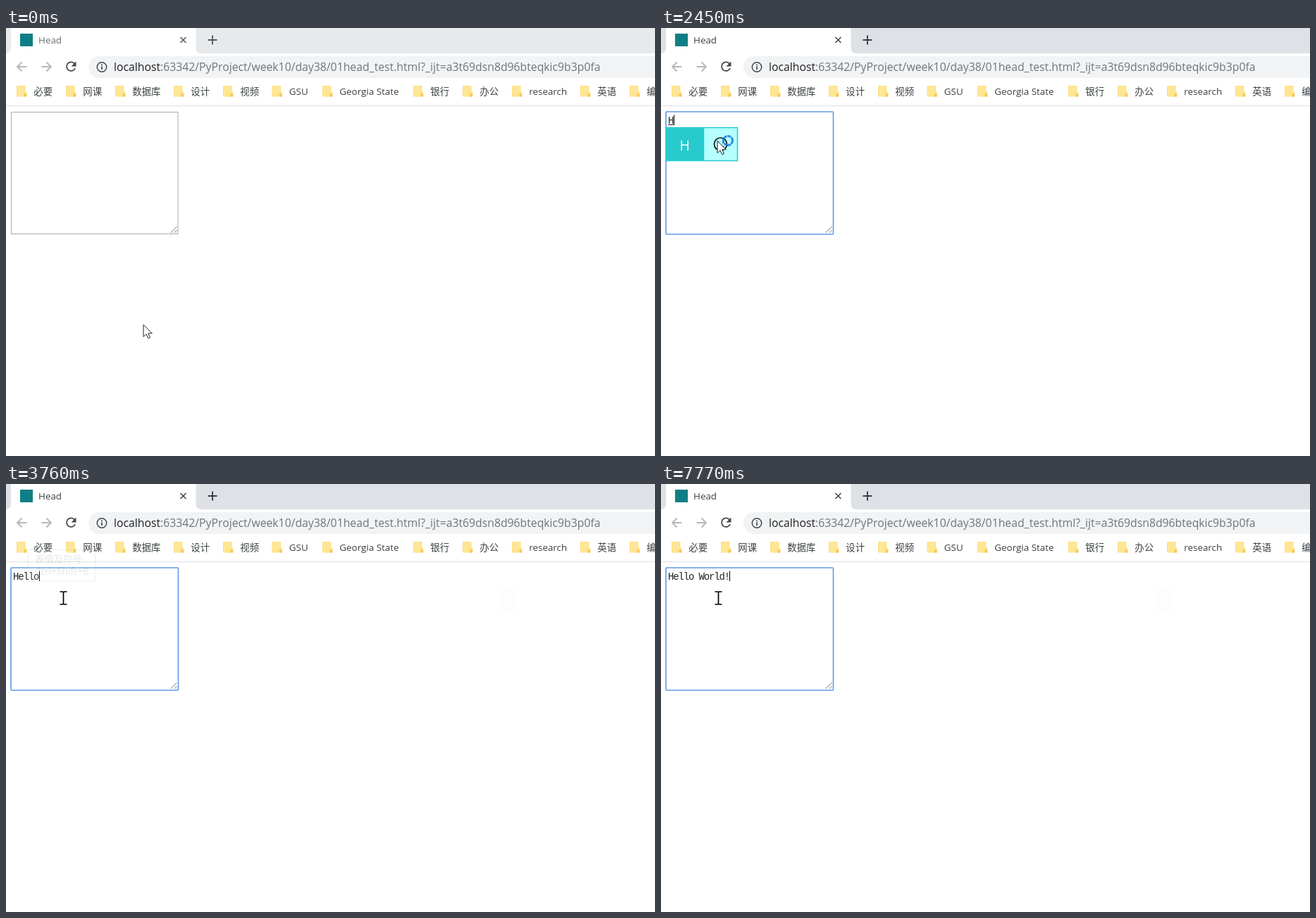
These frames come from a looping animation (921x608 px, 8 s). An HTML page:

```html
<!DOCTYPE html>
<html lang="zh">
<head>
<meta charset="utf-8">
<title>Head</title>
<style>
  html, body { margin: 0; width: 100%; height: 100%; overflow: hidden; background: #fff; }
  svg { display: block; font-family: "Open Sans", "Noto Sans CJK SC", "Noto Sans CJK", sans-serif; }
  text { white-space: pre; }
  .small { font-size: 13.4px; fill: #3c4043; }
  .typed { font: 14px "Liberation Mono", monospace; letter-spacing: -1.15px; fill: #222; }
  .word { font-size: 19.5px; }
  .index { font-size: 13.5px; fill: #777; }
  .line { fill: none; stroke: #45494d; stroke-width: 1.8; }
</style>
</head>
<body>
<svg width="921" height="608" viewBox="0 0 921 608">
  <rect id="strip" width="921" height="36"/>
  <path d="M-1 36Q7 36 7 28V0H269.500V28Q269.500 36 277.500 36Z" fill="#fff"/>
  <rect x="20" y="8" width="18" height="18" fill="#0e7f86"/>
  <g id="tab">
    <text x="46" y="22.3" font-size="13.4">Head</text>
    <path d="M247.5 13l8 8m0-8l-8 8" stroke="currentColor" stroke-width="1.5"/>
    <path d="M286.5 17h13M293 10.5v13" stroke="currentColor" stroke-width="1.9"/>
  </g>

  <path class="line" style="stroke:#b5b7ba" d="M29.5 55H16.5M22.5 48.5L16 55l6.5 6.5M50.5 55h13M57.5 48.5L64 55l-6.5 6.5"/>
  <path class="line" d="M97.3 50.7A6.3 6.3 0 1 0 98.2 57"/>
  <path d="M99.5 47.5v7h-7z" fill="#45494d"/>
  <path d="M921 40H132.5a15.5 15.5 0 0 0 0 31H921z" fill="#f1f3f4"/>
  <circle class="line" style="stroke-width:1.5" cx="136" cy="55.5" r="6.7"/>
  <path class="line" d="M136 54.5v4.500M136 51.5v1.700"/>
  <text x="153" y="61" font-size="15.78" fill="#70757a"><tspan fill="#202124">localhost</tspan>:63342/PyProject/week10/day38/01head_test.html?_ijt=a3t69dsn8d96bteqkic9b3p0fa</text>
  <g id="bookmarks"></g>
  <path d="M0 110.5H921" stroke="#dcdee1"/>

  <rect id="box" fill="#fff"/>
  <path d="M233.5 291l9-9M238.5 291l4-4" stroke="#777"/>
  <g id="live"></g>
</svg>
<script>
const $ = id => document.getElementById(id);
const TEAL = '#27cbcd';
const DURATION = 8000;
const MESSAGE = 'Hello World!';
const KEY_TIMES = [2450, 2680, 2990, 3130, 3290, 4450, 4980, 5290, 5530, 5690, 5920, 6770];
const CARET_OFF = [[0, 1050], [1430, 1980], [4150, 4450], [6450, 6770], [7300, 7770]];
const COMMIT = 3590;

// Suggestion lists by number of typed letters, with the right end of each list
const SUGGESTIONS = {
  2: [590, ['He', 'Her', 'Here', 'Hey', "He's", 'Hes', 'Hex']],
  3: [764.5, ['Held', 'Help', 'Helda', 'Helicopter', 'Helicopters', 'Hell', 'Hello']],
  4: [724.5, ['Hell', 'Hello', "Hell's", 'Hells', 'Hellos', 'Hellish', 'Hellholes']]
};

const setAll = (el, attrs) => Object.entries(attrs).forEach(([k, v]) => el.setAttribute(k, v));
const rect = (x, y, w, h, fill, stroke = 'none') =>
  `<rect x="${x}" y="${y}" width="${w}" height="${h}" fill="${fill}" stroke="${stroke}"/>`;
const path = (d, stroke, width = 1, fill = 'none') =>
  `<path d="${d}" stroke="${stroke}" stroke-width="${width}" fill="${fill}"/>`;
const text = (cls, x, y, s, style = '') =>
  `<text class="${cls}" x="${x}" y="${y}" style="${style}">${s}</text>`;

const pen = document.createElement('canvas').getContext('2d');
pen.font = '19.5px "Open Sans", sans-serif';
const wordWidth = s => pen.measureText(s).width;

$('bookmarks').innerHTML = [
  [15, '必要'], [85, '网课'], [155, '数据库'], [238, '设计'], [308, '视频'], [377.5, 'GSU'],
  [449, 'Georgia State'], [578, '银行'], [648, '办公'], [718, 'research'], [815, '英语'], [885, '编程']
].map(([x, label]) =>
  path(`M${x + .5} 82.5h11.5v9h2v5.500h-13.500z`, '#fbdf86', 1, '#ffe694') +
  rect(x + 10.5, 93.5, 3.5, 4, '#f5c94c') +
  text('small', x + 24.3, 95.3, label)).join('');

const arrow = (x, y) =>
  path(`M${x + .5} ${y + .5}v17l4-3.700 2.800 6 2.700-1.200-2.700-5.800h5.500z`, '#222', 1, '#fff');
const iBeam = (x, y) =>
  path(`M${x - 5} ${y - 9}h4l1 1 1-1h4M${x} ${y - 8}v16M${x - 5} ${y + 9}h4l1-1 1 1h4`, '#000', 1.7);

function smiley(x) {
  return `<circle cx="${x}" cy="165" r="9" fill="none" stroke="#111" stroke-width="1.7"/>` +
    path(`M${x - 4.5} 168q4.5 4.5 9 0M${x - 3.5} 161v2.500m7-2.500v2.500`, '#111', 1.7);
}

function popup(count) {
  const list = SUGGESTIONS[count];
  const single = MESSAGE.slice(0, count);
  const end = list ? list[0] : count === 1 ? 60.5 : 93.5;
  let out = rect(7.5, 141.5, end + 40.5, 47, '#fff');
  if (list) {
    let x = 26.7;
    list[1].forEach((word, i) => {
      const w = wordWidth(word);
      const style = i ? '' : 'fill:#fff';
      if (!i) out += rect(8, 142, x + w + 22.5, 46, '#57ffff');
      out += text('index', x, 173, i + 1, style) + text('word', x + 11.5, 174, word, style);
      x += w + 48.3;
    });
    out += rect(end - 24, 146.5, 23.5, 37.5, '#f0f0f0', '#c4c4c4') +
      path(`M${end - 18} 153l12 12-12 12`, '#444', 1.4);
  } else {
    out += rect(8, 142, end - 8, 46, count === 1 ? TEAL : '#57ffff') +
      text('word', (7 + end - wordWidth(single)) / 2, 174, single, 'fill:#fff');
    if (count === 1) out += rect(end, 142, 48, 46, '#b5ffff');
  }
  return out + smiley(end + 24) +
    path(`M7.5 141.5H${end + 48}V188.5H7.5zM${end} 141.5v47`, TEAL, 1.5);
}

function tooltip(t) {
  const opacity = t < 3370 ? 0 : t < 3450 ? .5 : t < COMMIT ? 1 : t < 3670 ? .75 : t < 3760 ? .4 : t < 3820 ? .12 : 0;
  return `<g opacity="${opacity}">` + rect(31.5, 93.5, 95, 44.5, '#fff', '#777') +
    text('small', 41, 111.5, '表情及符号') +
    text('small', 41, 128.5, 'Ctrl+Shift+B', 'font-size:13.9px') + '</g>';
}

// The pointer travels in nine even steps, passing its goal slightly before settling
function pointer(t) {
  const step = t < 270 ? 0 : Math.min(9, Math.floor((t - 270) / 77.5 + 1e-6) + 1);
  if (step === 9) return [81.5, 162];
  if (step === 8) return [76, 159];
  const p = step / 7, e = p * p * (3 - 2 * p);
  return [195 - 123 * e, 421 - 264 * e];
}

function render(t) {
  const focused = t >= 1050;
  const count = KEY_TIMES.filter(k => k <= t).length;
  const composing = count > 0 && t < COMMIT;
  const caret = 11.5 + Math.floor(count * 7.2);

  $('strip').setAttribute('fill', focused ? '#dee1e6' : '#e7eaed');
  $('tab').setAttribute('style', focused ? 'fill:#3c4043;color:#3c4043' : 'fill:#6a6e73;color:#55595e');
  setAll($('box'), focused
    ? { x: 7, y: 119, width: 237.5, height: 174, rx: 1, stroke: '#5f9ae8', 'stroke-width': 1.6 }
    : { x: 7.5, y: 119.5, width: 236.5, height: 173, rx: 0, stroke: '#acacac', 'stroke-width': 1 });

  let out = t >= 3290 ? rect(702, 148, 22, 35, '#fdfdfd') : '';
  out += text('typed', 10, 136, MESSAGE.slice(0, count));
  if (composing) out += path(`M10 137.5H${caret}`, '#222');
  if (!CARET_OFF.some(([a, b]) => t >= a && t < b)) out += path(`M${caret} 123.5v14.500`, '#000');
  if (composing) out += popup(count);
  out += tooltip(t);

  const [x, y] = pointer(t);
  out += composing ? arrow(79.5, 160) : y < 292 ? iBeam(x, y) : arrow(x - .5, y);
  if (t >= 2450 && t < 2530)
    out += '<circle cx="95" cy="160" r="6.5" fill="none" stroke="#2b8fe0" stroke-width="3" stroke-dasharray="5 .8"/>';
  $('live').innerHTML = out;
}

function tick() {
  render(performance.now() % DURATION);
  requestAnimationFrame(tick);
}
tick();
</script>
</body>
</html>
```
